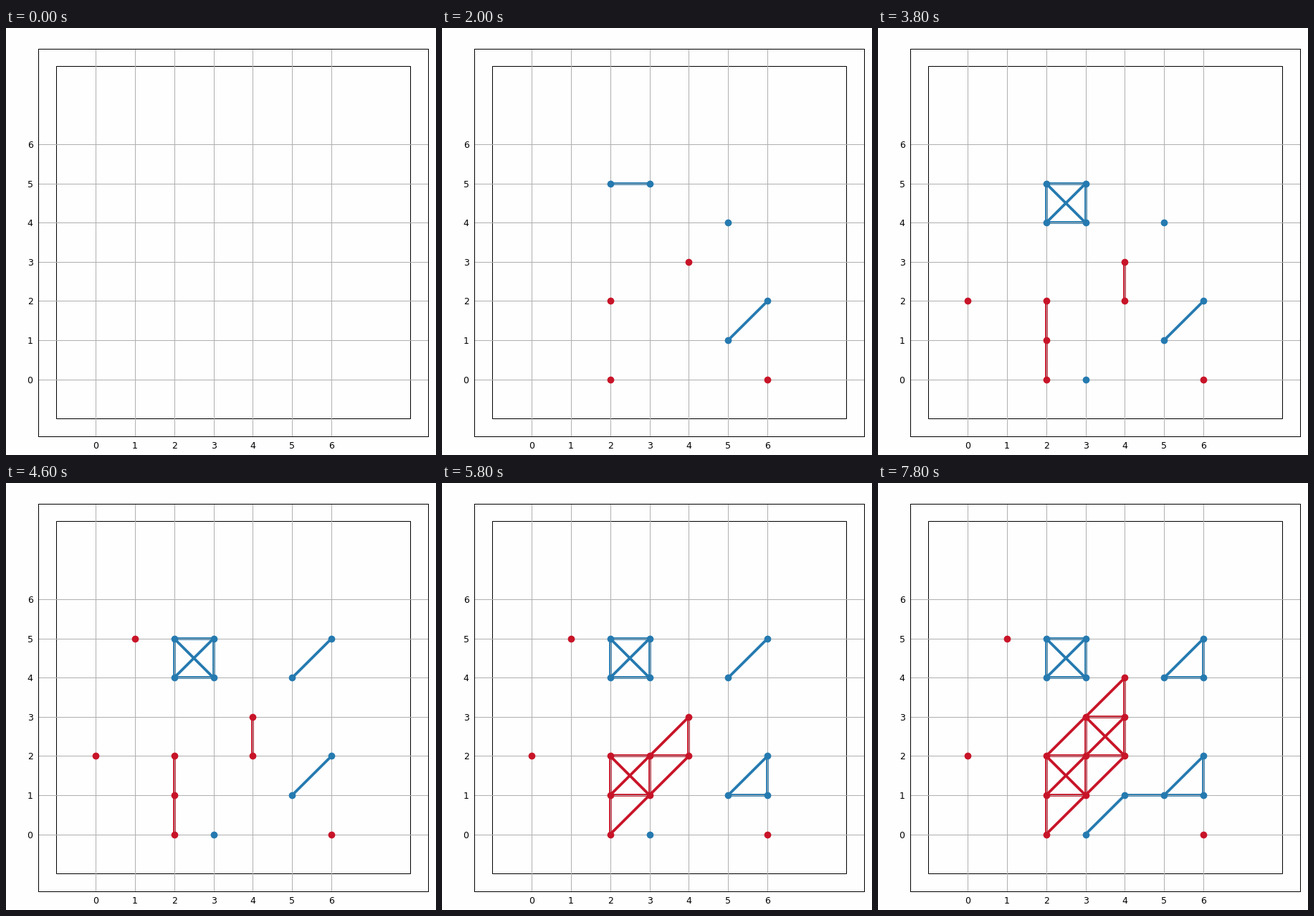
Animation of 600 by 595 pixels, one loop 8 s. Source, as a matplotlib script:

```python
from itertools import zip_longest

import matplotlib.pyplot as plt
from matplotlib.animation import FuncAnimation
from matplotlib.patches import Rectangle

W, H, DPI = 600, 595, 100
STEP_MS, STEPS = 200, 40
OPENING = 3
THIN = 0.72
BLUE, RED = "#257ab0", "#c81428"

# Dots in playing order; blue opens, then each round is one red and one blue dot.
BLUE_DOTS = [(5, 4), (2, 5), (3, 5), (6, 2), (5, 1), (3, 0),
             (3, 4), (2, 4), (6, 5), (6, 1), (6, 4), (4, 1)]
RED_DOTS = [(4, 3), (2, 0), (6, 0), (2, 2), (0, 2), (4, 2),
            (2, 1), (1, 5), (3, 1), (3, 2), (3, 3), (4, 4)]


def make_axes(fig):
    left, right, top, bottom = 45.3, 588.7, 28.6, 568.6
    ax = fig.add_axes([left / W, 1 - bottom / H,
                       (right - left) / W, (bottom - top) / H])
    ax.set(xlim=(-1.45, 8.45), ylim=(-1.45, 8.45),
           xticks=range(7), yticks=range(7), facecolor="#fefefe")
    ax.tick_params(length=0, pad=5.6, labelsize=9)
    ax.grid(color="#b0b0b0", linewidth=THIN)
    ax.spines[:].set_linewidth(THIN)
    ax.add_patch(Rectangle((-1, -1), 9, 9, fill=False, linewidth=THIN))
    return ax


def neighbours(i, dots):
    """Earlier dots of the same colour one king's move away from dot i."""
    x, y = dots[i]
    return [q for q in dots[:i] if max(abs(x - q[0]), abs(y - q[1])) == 1]


def add_dot(ax, i, dots, color):
    artists = [ax.scatter(*dots[i], s=36, color=color, linewidths=1, zorder=3)]
    for q in neighbours(i, dots):
        artists += ax.plot(*zip(dots[i], q), color=color, linewidth=2.7, zorder=1)
    return artists


def build(ax):
    """Pair each artist with its step; rounds with more links last longer."""
    timed = [(OPENING, a) for a in add_dot(ax, 0, BLUE_DOTS, BLUE)]
    start = OPENING + 1
    for i, (_, reply) in enumerate(zip_longest(RED_DOTS, BLUE_DOTS[1:])):
        links = len(neighbours(i, RED_DOTS))
        timed += [(start, a) for a in add_dot(ax, i, RED_DOTS, RED)]
        if reply:
            links = min(5, links + len(neighbours(i + 1, BLUE_DOTS)))
            timed += [(start + links // 2, a)
                      for a in add_dot(ax, i + 1, BLUE_DOTS, BLUE)]
        start += max(2, links)
    return timed


fig = plt.figure(figsize=(W / DPI, H / DPI), dpi=DPI, facecolor="#fefefe")
timed = build(make_axes(fig))


def draw(n):
    for start, artist in timed:
        artist.set_visible(n >= start)
    return [artist for _, artist in timed]


anim = FuncAnimation(fig, draw, frames=STEPS, interval=STEP_MS,
                     repeat=True, repeat_delay=0, blit=False)
plt.show()
```
